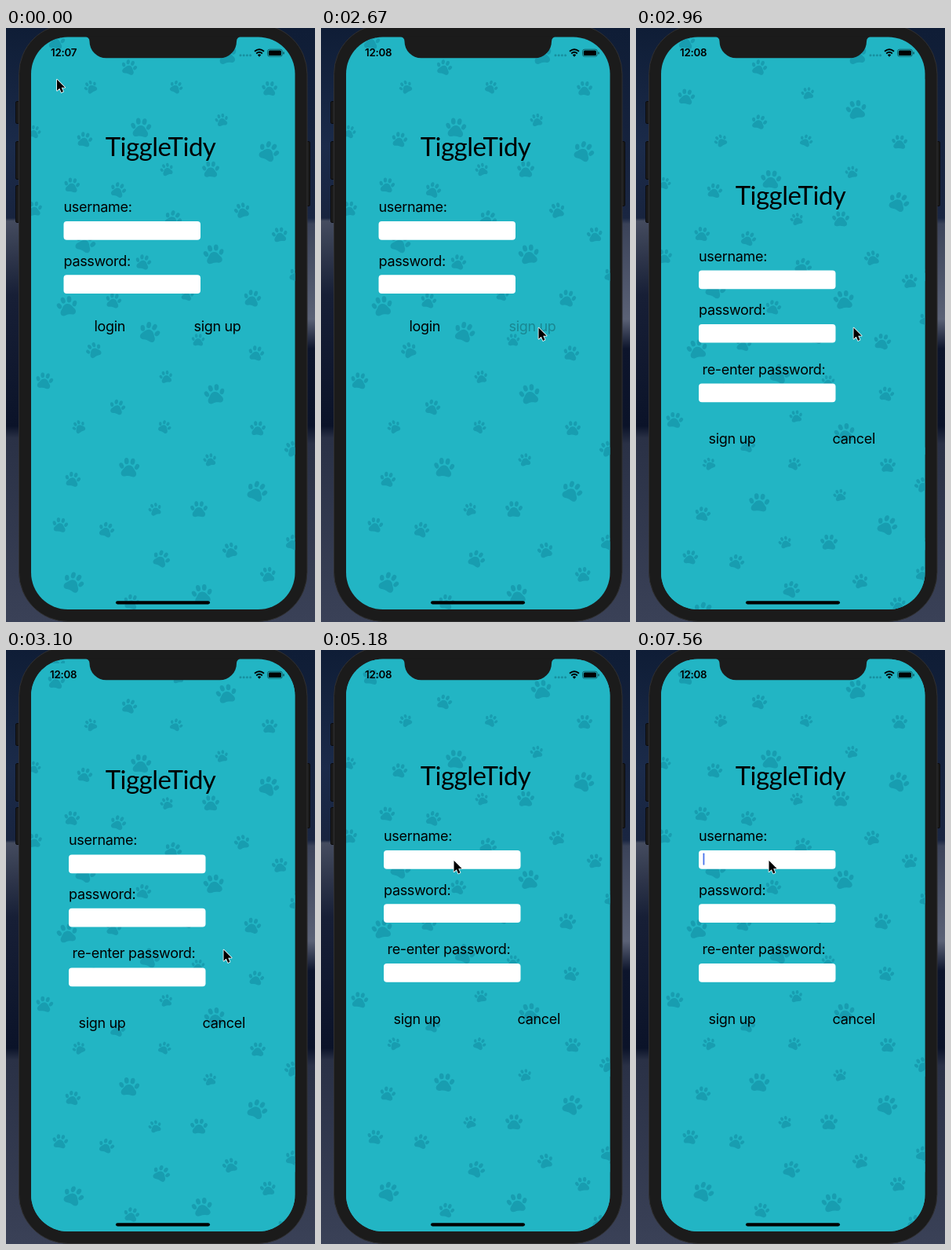
An HTML page for the animation above (8 s loop, 394 by 756 pixels).

```html
<!DOCTYPE html>
<html lang="en">
<head>
<meta charset="utf-8">
<title>Sign up flow</title>
<style>
html, body { margin: 0; width: 100%; height: 100%; overflow: hidden; background: #101a30; }
svg { display: block; width: 394px; height: 756px; }
text { font-family: Inter, Roboto, sans-serif; font-size: 18px; letter-spacing: -.32px; }
.title { font: 400 33px Lato, "Open Sans", sans-serif; letter-spacing: -.5px; text-anchor: middle; }
.clock { font-size: 13.3px; font-weight: 600; letter-spacing: -.2px; }
.field { fill: #fff; }
.paws { fill: #189db0; }
.bezel { fill: #1b1b1b; }
.page { fill: #22b5c4; }
</style>
</head>
<body>
<svg viewBox="0 0 394 756">
  <defs>
    <linearGradient id="left" x2="0" y2="1">
      <stop offset="0" stop-color="#0f1d36"/>
      <stop offset=".2" stop-color="#1b2b4a"/>
      <stop offset=".32" stop-color="#18243f"/>
      <stop offset=".325" stop-color="#454c5f"/>
      <stop offset=".45" stop-color="#171f36"/>
      <stop offset=".67" stop-color="#0b1329"/>
      <stop offset=".69" stop-color="#2a3146"/>
      <stop offset="1" stop-color="#3a4157"/>
    </linearGradient>
    <linearGradient id="right" x2="0" y2="1">
      <stop offset="0" stop-color="#0f1d36"/>
      <stop offset=".32" stop-color="#1a2642"/>
      <stop offset=".33" stop-color="#3b4359"/>
      <stop offset=".49" stop-color="#5b6276"/>
      <stop offset=".54" stop-color="#0d152c"/>
      <stop offset=".67" stop-color="#0b1329"/>
      <stop offset=".7" stop-color="#2a3146"/>
      <stop offset="1" stop-color="#3a4157"/>
    </linearGradient>
    <clipPath id="screen"><rect x="32" y="11.5" width="336.5" height="728.5" rx="47"/></clipPath>
    <clipPath id="page"><rect x="32" y="11.5" width="336.5" height="729"/></clipPath>
    <g id="paw">
      <path d="M0-2.500C4-2.500 5 1 7.500 4C9.500 7.500 7 10.500 3.500 9.500C1 8.800-1 8.800-3.500 9.500C-7 10.500-9.500 7.500-7.500 4C-5 1-4-2.500 0-2.500Z"/>
      <g id="toes">
        <ellipse cx="-8.300" cy="-1.500" rx="2.300" ry="3.200" transform="rotate(-25 -8.300 -1.500)"/>
        <ellipse cx="-3.300" cy="-6.800" rx="2.400" ry="3.400" transform="rotate(-8 -3.300 -6.800)"/>
      </g>
      <use href="#toes" transform="scale(-1 1)"/>
    </g>
    <g id="pattern" class="paws"></g>
  </defs>

  <rect width="197" height="756" fill="url(#left)"/>
  <rect x="197" width="197" height="756" fill="url(#right)"/>
  <g class="bezel" stroke="#0c0c0e">
    <rect x="12.5" y="93.5" width="6" height="28" rx="1.5"/>
    <rect x="12.5" y="144.5" width="6" height="48" rx="1.5"/>
    <rect x="12.5" y="200.5" width="6" height="47" rx="1.5"/>
    <rect x="381.5" y="144.5" width="6" height="82" rx="1.5"/>
  </g>
  <rect class="bezel" x="16.5" y="-4.5" width="367.5" height="760" rx="63" stroke="#303032"/>

  <g clip-path="url(#screen)">
    <rect class="page" x="32" y="11" width="337" height="730"/>
    <use href="#pattern"/>
    <text class="title" x="197" y="163">TiggleTidy</text>
    <text x="73.5" y="234">username:</text>
    <rect class="field" x="73.5" y="246" width="174.5" height="23.7" rx="4"/>
    <text x="73.5" y="302.5">password:</text>
    <rect class="field" x="73.5" y="314.3" width="174.5" height="23.7" rx="4"/>
    <text x="112.5" y="385.8">login</text>
    <text id="press" x="239.5" y="385.8">sign up</text>

    <g id="sheet" transform="translate(0 729)">
      <g clip-path="url(#page)">
        <rect class="page" x="32" y="11" width="337" height="730"/>
        <use href="#pattern" transform="translate(0 18.4) scale(1 .951)"/>
      </g>
      <text class="title" x="197" y="171.5">TiggleTidy</text>
      <text x="80" y="243">username:</text>
      <rect class="field" x="80" y="255" width="174.5" height="23.7" rx="4"/>
      <rect id="caret" x="85.5" y="258.5" width="1.8" height="15.3" rx=".8" fill="#4470ea" opacity="0"/>
      <text x="80" y="311.5">password:</text>
      <rect class="field" x="80" y="323.3" width="174.5" height="23.7" rx="4"/>
      <text x="84.5" y="387">re-enter password:</text>
      <rect class="field" x="80" y="399" width="174.5" height="23.7" rx="4"/>
      <text x="92.5" y="475.5">sign up</text>
      <text x="250.5" y="475.5">cancel</text>
    </g>
  </g>

  <path class="bezel" d="M100 10.5Q106.500 11.500 106.500 17A21.300 21.300 0 0 0 127.800 38.300H272.700A21.300 21.300 0 0 0 294 17Q294 11.500 300.500 10.500Z"/>
  <text class="clock" id="clock" x="57" y="36.3">12:07</text>
  <path d="M299 34.700h13" stroke="#1790a0" stroke-width="3" stroke-linecap="round" stroke-dasharray="0 4.200"/>
  <path d="M317 29.800Q323 24.600 329 29.800M319.200 32.400Q323 29.200 326.800 32.400" fill="none" stroke="#000" stroke-width="2"/>
  <path d="M320.800 34.300Q323 32.400 325.200 34.300L323 36.700Z"/>
  <rect x="333.5" y="27.2" width="18.8" height="9" rx="2.6" fill="none" stroke="#000" stroke-opacity=".45"/>
  <rect x="334.8" y="28.5" width="16.2" height="6.4" rx="1.5"/>
  <rect x="353.3" y="30.2" width="1.5" height="3.2" rx=".7" opacity=".5"/>
  <rect x="140" y="729.2" width="120" height="4.2" rx="2.1"/>

  <path id="cursor" d="M0 0V14.300L3.300 11.200L5.600 16.400L8 15.300L5.700 10.300H10.200Z" stroke="#fff" stroke-width="1.6" stroke-linejoin="round" paint-order="stroke"/>
</svg>
<script>
const LOOP = 8000, STEP = 148;
const $ = id => document.getElementById(id);
const clamp = v => Math.min(1, Math.max(0, v));
const ease = p => p < .5 ? 4 * p ** 3 : 1 - 4 * (1 - p) ** 3;

// paw centres in one tile, grouped by width; angles are random
const paws = {
  16: [[108, 75], [217, 75], [275, 117], [205, 180], [231, 339], [245, 397], [204, 444], [36, 132]],
  19: [[157, 50], [336, 77], [100, 142], [84, 200], [143, 206], [301, 232], [349, 263], [175, 298],
       [137, 347], [112, 410], [319, 414], [36, 230], [371, 314], [381, 222], [380, 103]],
  21: [[261, 180], [213, 243], [314, 344], [49, 449]],
  25: [[172, 127], [335, 157], [101, 273], [265, 288], [78, 354], [183, 387], [266, 466]]
};
let seed = 7;
const random = () => (seed = seed * 16807 % 2147483647) / 2147483647;

for (const [width, spots] of Object.entries(paws)) {
  for (const [x, y] of spots) {
    const angle = random() * 60 - 30;
    for (let row = -1; row < 3; row++) {
      const paw = document.createElementNS('http://www.w3.org/2000/svg', 'use');
      paw.setAttribute('href', '#paw');
      paw.setAttribute('transform',
        `translate(${x - 15 * row} ${y + 432.5 * row}) rotate(${angle}) scale(${width / 21})`);
      $('pattern').append(paw);
    }
  }
}

// pointer stops: x, y, departure and arrival step
const stops = [[65, 65.5, 4, 4], [327, 462.5, 4, 8], [277.5, 381.5, 8, 12], [169.5, 268, 22, 25]];

function pointer(step) {
  let [x, y] = stops[0];
  for (const [toX, toY, from, to] of stops.slice(1)) {
    const p = ease(clamp((step - from) / (to - from)));
    x += (toX - x) * p;
    y += (toY - y) * p;
  }
  return [x, y];
}

// critically damped spring, 1 to 0
function spring(ms) {
  const u = Math.max(0, ms) * .01826;
  return (1 + u) * Math.exp(-u);
}

// one second blink with soft edges
function blink(ms) {
  if (ms < 0) return 0;
  const p = ms / 1000 % 1;
  return p < .8 ? clamp((.62 - p) / .17) : clamp((p - .93) / .07);
}

function draw(now) {
  // the screen refreshes in coarse steps
  const step = Math.floor((now % LOOP + 10) / STEP), ms = step * STEP;
  $('cursor').setAttribute('transform', `translate(${pointer(step)})`);
  $('sheet').setAttribute('transform', `translate(0 ${729 * spring(ms - 2726)})`);
  $('caret').setAttribute('opacity', blink(ms - 4550));
  $('press').setAttribute('opacity', step < 18 ? 1 : .25);
  $('clock').textContent = step < 7 ? '12:07' : '12:08';
  $('clock').setAttribute('x', step < 7 ? 57 : 56);
  requestAnimationFrame(draw);
}
requestAnimationFrame(draw);
</script>
</body>
</html>
```
